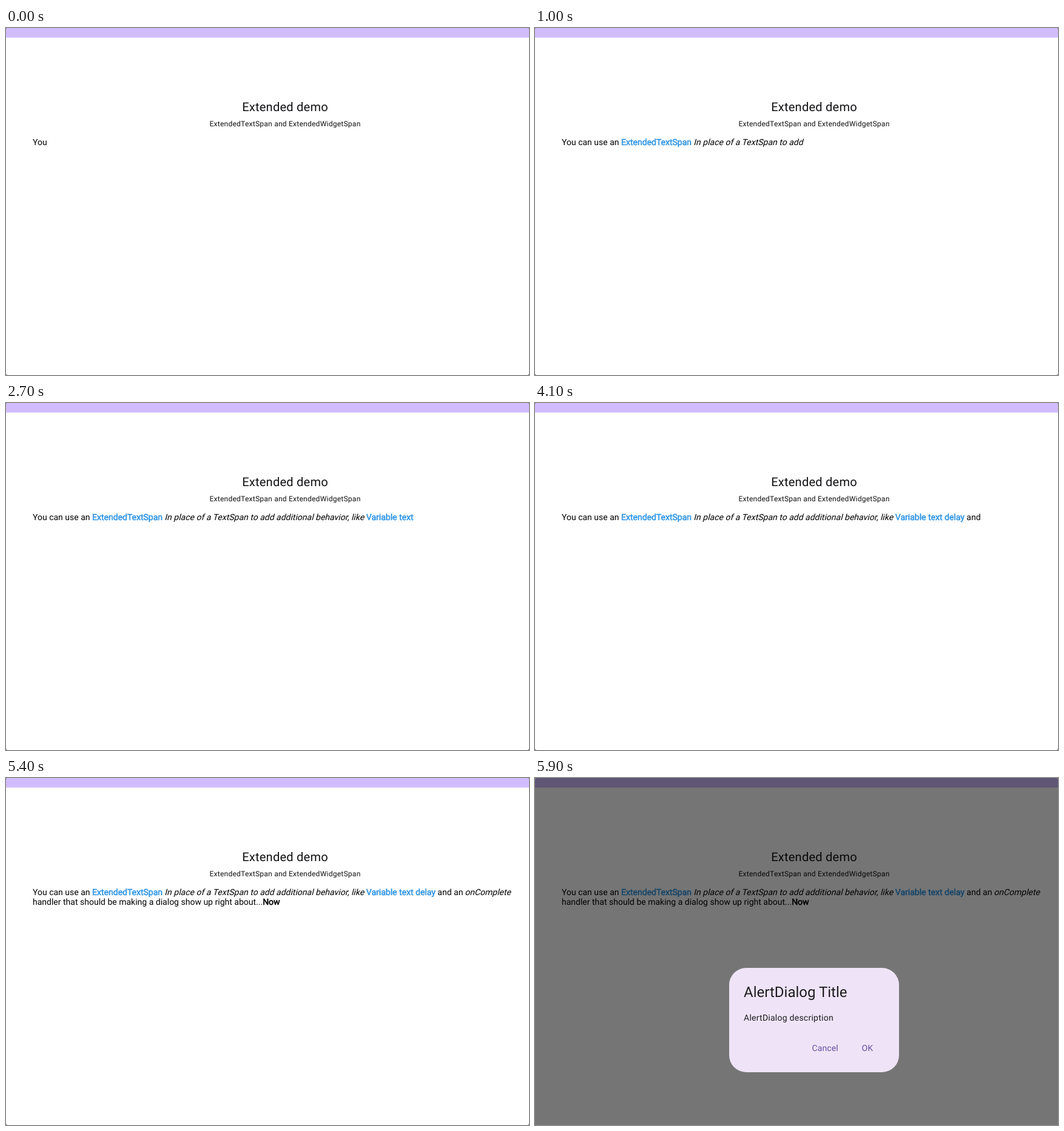
Recreate the animation shown at these times as an HTML page. Size 862 by 572 pixels, loop 7200 ms.

```html
<!DOCTYPE html>
<html lang="en">
<head>
<meta charset="utf-8">
<title>Extended demo</title>
<style>
  html, body { margin: 0; width: 100%; height: 100%; overflow: hidden; background: #555; }
  #stage {
    position: relative; width: 862px; height: 572px; overflow: hidden;
    border-radius: 3px; background: #fff; color: #000;
    font: 14px/16px Roboto, sans-serif; text-rendering: geometricPrecision;
  }
  #stage > *, #dialog > * { position: absolute; white-space: nowrap; }
  #bar { left: 0; top: 0; width: 100%; height: 15px; background: #d1bcff; border-bottom: 1px solid #dccdff; }
  .heading { left: 0; width: 920px; text-align: center; color: #111013; letter-spacing: .25px; }
  #title { top: 118px; font-size: 20px; line-height: 24px; }
  #subtitle { top: 151px; font-size: 12px; line-height: 14px; }
  #story { left: 44px; top: 181px; }
  .bold { -webkit-text-stroke: .57px; }
  .blue { color: #3196e5; }
  .slanted { display: inline-block; transform: skewX(-14deg); transform-origin: 0 9px; }
  #shade { inset: 0; background: #000; }
  #dialog {
    left: 320px; top: 313px; width: 280px; height: 172px;
    border-radius: 28px; background: #efe4f7; color: #1c1b1f;
  }
  #name { left: 24px; top: 24px; font-size: 24px; line-height: 32px; }
  #description { left: 24px; top: 73px; line-height: 20px; letter-spacing: .25px; }
  .button { top: 123px; line-height: 20px; letter-spacing: .1px; color: #6750a4; }
</style>
</head>
<body>
<div id="stage">
  <div id="bar"></div>
  <div id="title" class="heading">Extended demo</div>
  <div id="subtitle" class="heading">ExtendedTextSpan and ExtendedWidgetSpan</div>
  <div id="story"></div>
  <div id="shade"></div>
  <div id="dialog">
    <div id="name">AlertDialog Title</div>
    <div id="description">AlertDialog description</div>
    <div class="button" style="left:136.5px">Cancel</div>
    <div class="button" style="left:218.5px">OK</div>
  </div>
</div>
<script>
const LOOP = 7200, TICK = 100, DIALOG_AT = 5800;

// Each run: style, text, the tick at which each word appears, what follows it.
const runs = [
  ["", "You can use an", [0, 1, 2, 3], " "],
  ["bold blue", "ExtendedTextSpan", [3], " "],
  ["slanted", "In place of a TextSpan to add additional behavior, like",
    [5, 6, 7, 8, 8, 10, 10, 11, 13, 15], " "],
  ["bold blue", "Variable text delay", [16, 27, 33], " "],
  ["", "and an", [41, 42], " "],
  ["slanted", "onComplete", [42], "<br>"],
  ["", "handler that should be making a dialog show up right about...",
    [46, 47, 48, 49, 49, 50, 50, 51, 52, 52, 53], ""],
  ["bold", "Now", [54], ""]
];

const byId = id => document.getElementById(id);
const shade = byId("shade"), dialog = byId("dialog"), story = byId("story");

story.innerHTML = runs.map(([style, text, ticks, after]) => {
  const words = text.split(" ").map((word, i) => `<span data-tick="${ticks[i]}">${word}</span>`);
  return `<span class="${style}">${words.join(" ")}</span>${after}`;
}).join("");
const words = [...story.querySelectorAll("[data-tick]")];

const show = (element, on) => element.style.visibility = on ? "visible" : "hidden";

function draw() {
  const time = performance.now() % LOOP;
  for (const word of words) show(word, time >= word.dataset.tick * TICK);

  const open = time >= DIALOG_AT;
  show(shade, open);
  show(dialog, open);
  shade.style.opacity = time >= DIALOG_AT + TICK ? .54 : .533;
  requestAnimationFrame(draw);
}
draw();
</script>
</body>
</html>
```
